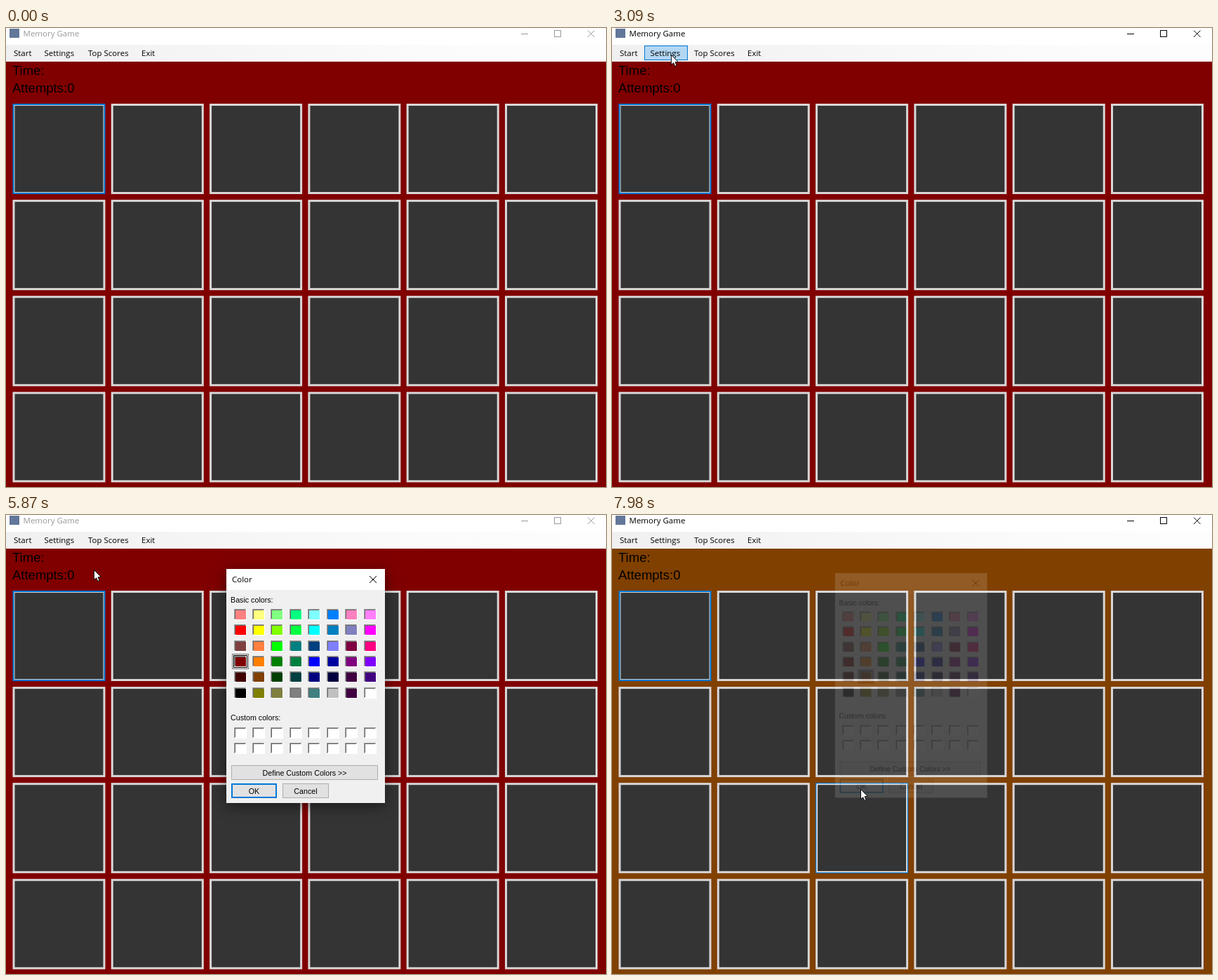
An HTML page with a canvas that plays this animation: 855x655 px, repeating every 8000 ms.

```html
<!DOCTYPE html>
<html lang="en">
<head>
<meta charset="utf-8">
<title>Memory Game</title>
<style>
  html, body { margin: 0; width: 100%; height: 100%; overflow: hidden; background: #800000; }
  canvas { display: block; }
</style>
</head>
<body>
<canvas id="stage" width="855" height="655"></canvas>
<script>
const W = 855, H = 655, LOOP = 8000;
const stage = document.getElementById('stage').getContext('2d');
const layer = document.createElement('canvas');
layer.width = W;
layer.height = H;
const layerCtx = layer.getContext('2d');

const UI_FONT = '11.5px "Open Sans", "Noto Sans", sans-serif';
const DIALOG_FONT = '10.7px "Liberation Sans", Arial, sans-serif';
const LABEL_FONT = '18.5px "Liberation Sans", Arial, sans-serif';
const BLUE = '#0078d7', HOT = '#b3d7f3';

const TIME = {
  activate: 2090, press: 4510, menuOpen: 4540, menuFull: 4610, menuClose: 5480,
  dialogOpen: 5600, dialogFull: 5870, pick: 6580,
  okPress: 7700, dialogClose: 7800, recolor: 7880, dialogGone: 8012
};

const BASIC_COLORS = [
  'ff8080 ffff80 80ff80 00ff80 80ffff 0080ff ff80c0 ff80ff',
  'ff0000 ffff00 80ff00 00ff40 00ffff 0080c0 8080c0 ff00ff',
  '804040 ff8040 00ff00 008080 004080 8080ff 800040 ff0080',
  '800000 ff8000 008000 008040 0000ff 0000a0 800080 8000ff',
  '400000 804000 004000 004040 000080 000040 400040 400080',
  '000000 808000 808040 808080 408080 c0c0c0 400040 ffffff'
].map(row => row.split(' ').map(c => '#' + c));

// Pointer stops: time, x, y
const STOPS = [
  [1200, 770, 650], [1990, 89, 57], [2120, 89, 57], [2730, 83, 37],
  [2930, 84, 38], [3090, 84, 38], [3300, 86, 41], [3630, 86, 41],
  [3980, 80, 96], [4410, 69, 37], [4910, 69, 37], [5330, 85, 52],
  [5700, 85, 52], [6410, 360, 230], [6800, 360, 230], [7120, 360, 348],
  [7370, 356, 375], [7540, 354, 391]
];

const clamp = v => Math.max(0, Math.min(1, v));
const progress = (t, from, to) => clamp((t - from) / (to - from));
const smooth = u => u * u * (3 - 2 * u);
const inside = (p, x, y, w, h) =>
  p && p.x >= x && p.x < x + w && p.y >= y && p.y < y + h;

function pointerAt(t) {
  if (t < STOPS[0][0]) return null;
  let i = 0;
  while (i < STOPS.length - 2 && t >= STOPS[i + 1][0]) i++;
  const [t0, x0, y0] = STOPS[i], [t1, x1, y1] = STOPS[i + 1];
  const u = progress(t, t0, t1);
  const k = i === 0 ? 1 - Math.pow(1 - u, 2.3) : smooth(u);
  return { x: Math.round(x0 + (x1 - x0) * k), y: Math.round(y0 + (y1 - y0) * k) };
}

function rect(c, x, y, w, h, fill) {
  c.fillStyle = fill;
  c.fillRect(x, y, w, h);
}

function frame(c, x, y, w, h, color, line = 1) {
  c.strokeStyle = color;
  c.lineWidth = line;
  c.strokeRect(x + line / 2, y + line / 2, w - line, h - line);
}

function text(c, str, x, y, font, color = '#000', align = 'left') {
  c.font = font;
  c.fillStyle = color;
  c.textAlign = align;
  c.fillText(str, x, y);
}

function cross(c, x, y, size, color) {
  c.strokeStyle = color;
  c.lineWidth = 1;
  c.beginPath();
  c.moveTo(x, y);
  c.lineTo(x + size, y + size);
  c.moveTo(x + size, y);
  c.lineTo(x, y + size);
  c.stroke();
}

function drawTitleBar(c, active) {
  const ink = active ? '#000' : '#999';
  rect(c, 0, 0, W, 24, '#fff');
  rect(c, 5, 1, 14, 13, '#62779a');
  text(c, 'Memory Game', 24.5, 12, UI_FONT, ink);
  rect(c, 734, 8, 10, 1, ink);
  frame(c, 781, 3, 10, 10, ink);
  cross(c, 829, 3.5, 9.5, ink);
}

function drawMenuBar(c, t, pointer, active) {
  const shade = c.createLinearGradient(0, 0, W, 0);
  shade.addColorStop(0, '#f0f0f0');
  shade.addColorStop(0.7, '#fbfbfb');
  shade.addColorStop(1, '#fdfdfd');
  rect(c, 0, 24, W, 24, shade);
  const open = t >= TIME.press && t < TIME.menuClose;
  if (open) {
    rect(c, 46, 26, 62, 20, '#f8f8f8');
    frame(c, 46, 26, 62, 21, '#808080');
  } else if (active && inside(pointer, 46, 25, 62, 21)) {
    rect(c, 46, 25, 62, 21, HOT);
    frame(c, 46, 25, 62, 21, BLUE);
  }
  [['Start', 11], ['Settings', 54.5], ['Top Scores', 117], ['Exit', 193]]
    .forEach(([name, x]) => text(c, name, x, 40, UI_FONT));
}

function drawCards(c, pointer) {
  for (let row = 0; row < 4; row++) {
    for (let col = 0; col < 6; col++) {
      const x = 9.5 + col * 140.3, y = 108 + row * 137.1, w = 132, h = 129;
      const focused = row + col === 0;
      const hot = inside(pointer, x, y, w, h);
      rect(c, x, y, w, h, focused || hot ? BLUE : '#d9d6d6');
      if (focused) rect(c, x + 2, y + 2, w - 4, h - 4, '#d0d0d0');
      else if (hot) rect(c, x + 1.2, y + 1.2, w - 2.4, h - 2.4, '#e2e2e2');
      rect(c, x + 3, y + 3, w - 6, h - 6, '#343434');
    }
  }
}

function drawDropDown(c, t, pointer) {
  if (t < TIME.menuOpen || t >= TIME.menuClose) return;
  c.save();
  c.globalAlpha = 0.3 + 0.7 * progress(t, TIME.menuOpen, TIME.menuFull);
  rect(c, 50, 50, 164, 47, 'rgba(0,0,0,.3)');
  rect(c, 46, 45, 165, 49, '#fff');
  const margin = c.createLinearGradient(47, 0, 72, 0);
  margin.addColorStop(0, '#fcfcfc');
  margin.addColorStop(1, '#f0f0f0');
  rect(c, 47, 46, 25, 47, margin);
  frame(c, 46, 45, 165, 49, '#808080');
  rect(c, 47, 45, 60, 1, '#f8f8f8');
  ['Edit Background', 'Edit Images'].forEach((name, i) => {
    const y = 47 + i * 22;
    if (inside(pointer, 48, y, 161, 22)) {
      rect(c, 48, y, 161, 22, HOT);
      frame(c, 48, y, 161, 22, BLUE);
    }
    text(c, name, 82, y + 15, UI_FONT);
  });
  c.restore();
}

function swatch(c, cx, cy, color, selected) {
  const x = cx - 9, y = cy - 8;
  rect(c, x, y, 18, 16, '#fff');
  rect(c, x, y, 17, 15, '#a0a0a0');
  rect(c, x + 1, y + 1, 16, 14, '#e3e3e3');
  rect(c, x + 1, y + 1, 15, 13, '#696969');
  rect(c, x + 2, y + 2, 15, 13, color);
  if (selected) {
    frame(c, x - 1, y - 1, 20, 18, '#000');
    c.setLineDash([1, 1]);
    frame(c, x - 3, y - 3, 24, 22, '#000');
    c.setLineDash([]);
  }
}

function button(c, label, x, y, w, pointer, { primary = false, pressed = false } = {}) {
  const hot = inside(pointer, x, y, w, 21);
  rect(c, x, y, w, 21, pressed ? '#cce4f7' : hot ? '#e5f1fb' : '#e1e1e1');
  frame(c, x, y, w, 21, primary || hot ? BLUE : '#adadad', primary ? 2 : 1);
  text(c, label, x + w / 2, y + 14.5, DIALOG_FONT, '#000', 'center');
}

function paintDialog(c, t, pointer, alpha) {
  c.clearRect(0, 0, W, H);
  c.save();
  c.shadowColor = `rgba(0,0,0,${0.5 * alpha * alpha})`;
  c.shadowBlur = 18;
  c.shadowOffsetY = 4;
  rect(c, 314, 77, 226, 334, '#f0f0f0');
  c.restore();
  rect(c, 314, 77, 226, 30, '#fff');
  text(c, 'Color', 322, 96, UI_FONT);
  cross(c, 518, 87, 10, '#000');

  const column = i => Math.round(333.5 + i * 26.45);
  const picked = t >= TIME.pick ? [4, 1] : [3, 0];
  text(c, 'Basic colors:', 320, 125, DIALOG_FONT);
  BASIC_COLORS.forEach((row, r) => row.forEach((color, i) =>
    swatch(c, column(i), Math.round(142 + r * 22.35), color, picked[0] === r && picked[1] === i)));
  text(c, 'Custom colors:', 320, 293, DIALOG_FONT);
  for (let i = 0; i < 16; i++) swatch(c, column(i % 8), i < 8 ? 311 : 333, '#fff');

  button(c, 'Define Custom Colors >>', 321, 357, 209, pointer);
  button(c, 'OK', 321, 383, 65, pointer, {
    primary: true, pressed: t >= TIME.okPress && t < TIME.dialogClose
  });
  button(c, 'Cancel', 394, 383, 66, pointer);
}

function drawDialog(c, t, pointer) {
  if (t < TIME.dialogOpen) return;
  const alpha = t < TIME.dialogClose
    ? progress(t, TIME.dialogOpen, TIME.dialogFull)
    : 1 - progress(t, TIME.dialogClose, TIME.dialogGone);
  paintDialog(layerCtx, t, pointer, alpha);
  const scale = 0.953 + 0.047 * alpha;
  c.save();
  c.globalAlpha = alpha;
  c.translate(427 - (1 - alpha), 244 - (1 - alpha));
  c.scale(scale, scale);
  c.drawImage(layer, -427, -244);
  c.restore();
}

function drawPointer(c, p) {
  if (!p) return;
  const shape = [[0, 0], [0, 14], [3.2, 11.2], [5.4, 16], [7.6, 15], [5.5, 10.3], [9.8, 10]];
  c.beginPath();
  shape.forEach(([x, y]) => c.lineTo(p.x + 0.5 + x, p.y + 0.5 + y));
  c.closePath();
  c.fillStyle = '#fff';
  c.fill();
  c.strokeStyle = '#000';
  c.lineWidth = 0.9;
  c.stroke();
}

function render(t) {
  const c = stage;
  const pointer = pointerAt(t);
  const modal = t >= TIME.menuClose && t < TIME.recolor;
  const active = t >= TIME.activate && !modal;
  rect(c, 0, 0, W, H, t >= TIME.recolor ? '#804000' : '#800000');
  drawTitleBar(c, active);
  drawMenuBar(c, t, pointer, active);
  text(c, 'Time:', 9, 67, LABEL_FONT);
  text(c, 'Attempts:0', 9, 92, LABEL_FONT);
  drawCards(c, modal ? null : pointer);
  drawDropDown(c, t, pointer);
  drawDialog(c, t, pointer);
  drawPointer(c, pointer);
}

const start = performance.now();
function tick() {
  render((performance.now() - start) % LOOP);
  requestAnimationFrame(tick);
}
tick();
</script>
</body>
</html>
```
